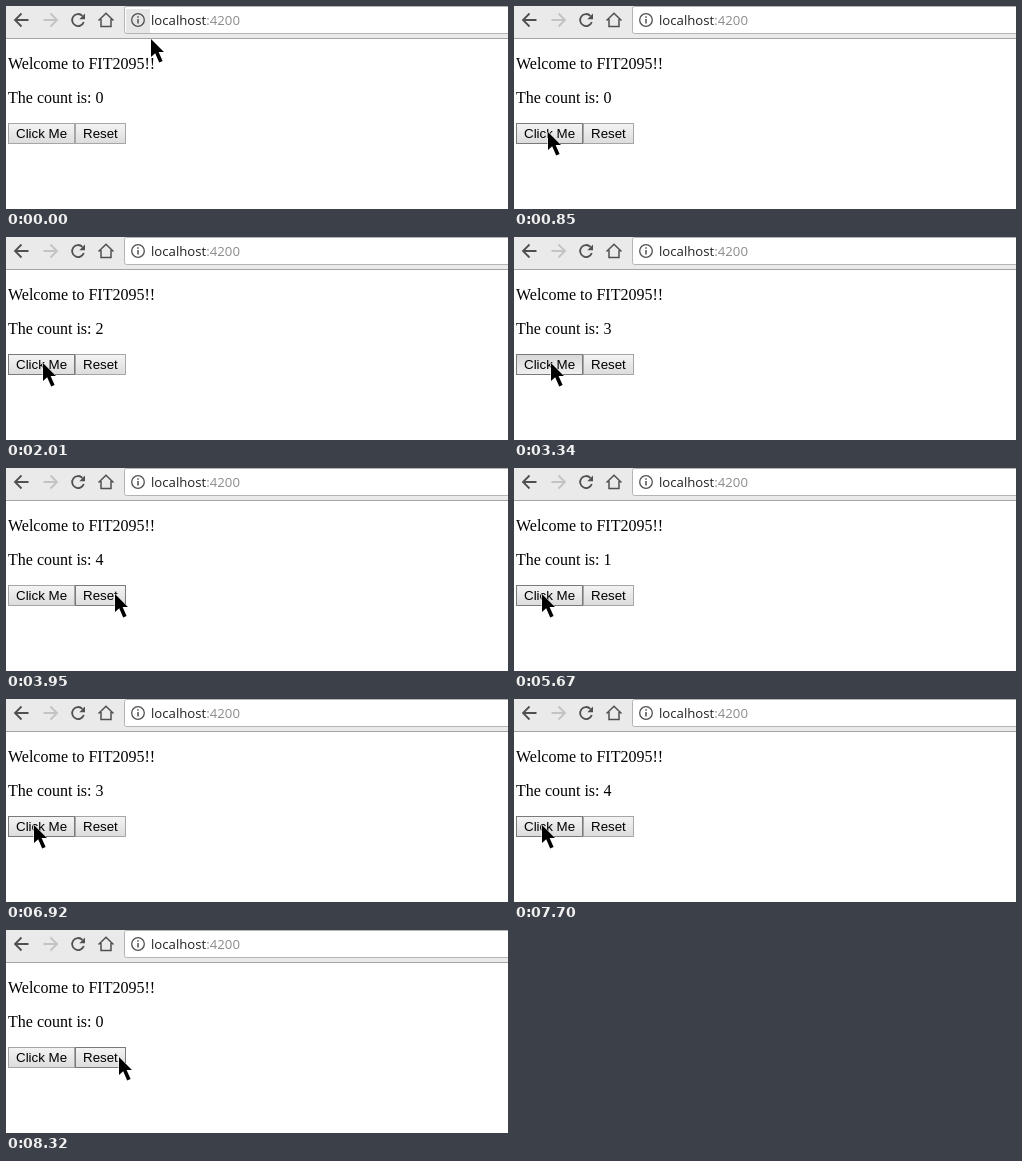
An HTML page that plays this animation: 502x203 px, repeating every 8.8 s.

```html
<!DOCTYPE html>
<html lang="en">
<head>
<meta charset="utf-8">
<title>Click counter</title>
<style>
  html, body { margin: 0; width: 100%; height: 100%; overflow: hidden; background: #fff; }
  svg { display: block; width: 502px; height: 203px; }
  .page { font: 16px "Liberation Serif", "Times New Roman", serif; fill: #000; }
  .url { font: 13.2px "Open Sans", "Noto Sans", sans-serif; fill: #222; }
  .icon { fill: none; stroke: #505050; stroke-width: 1.8; }
  .button text { font: 13.333px "Liberation Sans", Arial, sans-serif; fill: #000; }
  .button rect { fill: url(#up); stroke: #a6a6a6; }
  .button.hover rect { stroke: #7a7a7a; }
  .button.down rect { fill: url(#down); stroke: #7a7a7a; }
</style>
</head>
<body>
<svg viewBox="0 0 502 203">
  <defs>
    <linearGradient id="up" x2="0" y2="1">
      <stop stop-color="#f4f4f4"/><stop offset="1" stop-color="#dcdcdc"/>
    </linearGradient>
    <linearGradient id="down" x2="0" y2="1">
      <stop stop-color="#d8d8d8"/><stop offset="1" stop-color="#f0f0f0"/>
    </linearGradient>
  </defs>

  <rect width="502" height="32" fill="#eaeaea"/>
  <rect y="32" width="502" height="1" fill="#a4a4a4"/>
  <rect x="118.5" y=".5" width="400" height="27" rx="2" fill="#fff" stroke="#b4b4b4"/>
  <rect id="infoHover" x="120" y="3" width="24" height="24" fill="#e6e6e6"/>

  <g class="icon">
    <path id="arrow" d="M22.5 14H9.5M15.5 7.5L9 14L15.5 20.5"/>
    <use href="#arrow" transform="matrix(-1 0 0 1 60 0)" opacity=".25"/>
    <path d="M76.4 9.8A6 6 0 1 0 77.8 16"/>
    <path d="M79 7.5V13.2H73.3Z" fill="#505050" stroke="none"/>
    <path d="M92.5 14.5L100 7.2L107.5 14.5M95 13V20.5H105V13" stroke-width="1.5"/>
    <circle cx="132" cy="14" r="6.3" stroke-width="1.3"/>
    <path d="M132 13V17.5M132 10.2V11.8" stroke-width="1.5"/>
  </g>
  <text class="url" x="145" y="19">localhost<tspan fill="#8c8c8c">:4200</tspan></text>

  <g class="page">
    <text x="2" y="63">Welcome to FIT2095!!</text>
    <text id="count" x="2" y="97">The count is: 0</text>
  </g>
  <g class="button" id="click">
    <rect x="2.5" y="117.5" width="66" height="20"/>
    <text x="10" y="132">Click Me</text>
  </g>
  <g class="button" id="reset">
    <rect x="69.5" y="117.5" width="50" height="20"/>
    <text x="77" y="132">Reset</text>
  </g>

  <path id="cursor" d="M0 0V18L4.2 14.2L8.2 23.6L11.6 22.1L7.6 13H13Z"
        fill="#000" stroke="#fff" stroke-width="1" stroke-linejoin="round" paint-order="stroke"/>
</svg>
<script>
  const LOOP = 8800, STEP = 78, HOLD = 75, CLICKS = 4;
  const el = id => document.getElementById(id);
  const [infoHover, count, cursor] = ["infoHover", "count", "cursor"].map(el);
  const buttons = { click: el("click"), reset: el("reset") };

  // Each glide ends at x, y; bend is the control point of a curved path.
  const home = { x: 145, y: 33 };
  const glides = [
    { from: 0, to: 620, x: 38, y: 126, bend: { x: 182, y: 160 } },
    { from: 695, to: 850, x: 34, y: 126 },
    { from: 1395, to: 1550, x: 37, y: 126 },
    { from: 3725, to: 3950, x: 109, y: 126 },
    { from: 4182, to: 4260, x: 106, y: 126 },
    { from: 4975, to: 5130, x: 28, y: 126 },
    { from: 7625, to: 7780, x: 113, y: 127 }
  ];
  // Evenly spaced clicks, then a reset.
  const rounds = [
    { first: 1240, gap: 695, reset: 4580 },
    { first: 5520, gap: 660, reset: 8245 }
  ];

  const ease = p => p * p * (3 - 2 * p);
  const mix = (a, b, p) => a + (b - a) * p;
  const curve = (a, b, c, p) => mix(mix(a, b, p), mix(b, c, p), p);

  function pointer(t) {
    const i = glides.findLastIndex(g => g.from <= t);
    const end = glides[i], start = glides[i - 1] || home;
    const steps = Math.round((end.to - end.from) / STEP);
    const progress = Math.min(1, (t - end.from) / (end.to - end.from));
    const p = ease(Math.floor(progress * steps) / steps);
    const along = axis => {
      const a = start[axis], c = end[axis];
      return Math.round(curve(a, end.bend ? end.bend[axis] : (a + c) / 2, c, p));
    };
    return [along("x"), along("y")];
  }

  function counter(t) {
    const round = rounds.findLast(r => r.first <= t);
    if (!round) return { value: 0, pressed: false };
    const since = t - round.first;
    const done = Math.min(CLICKS, Math.floor((since - HOLD) / round.gap) + 1);
    const clicking = done < CLICKS && since >= done * round.gap;
    const resetting = t >= round.reset && t < round.reset + HOLD;
    return {
      value: t >= round.reset + HOLD ? 0 : done,
      pressed: clicking || resetting
    };
  }

  function draw(t) {
    const [x, y] = pointer(t);
    const { value, pressed } = counter(t);
    const over = y < 117 || y > 137 || x > 119 ? "" : x < 69 ? "click" : "reset";

    cursor.setAttribute("transform", `translate(${x} ${y})`);
    count.textContent = "The count is: " + value;
    infoHover.style.display = t < STEP ? "" : "none";
    for (const name in buttons) {
      buttons[name].classList.toggle("hover", name === over);
      buttons[name].classList.toggle("down", name === over && pressed);
    }
  }

  const start = performance.now();
  function tick() {
    draw(Math.max(0, performance.now() - start) % LOOP);
    requestAnimationFrame(tick);
  }
  tick();
</script>
</body>
</html>
```
